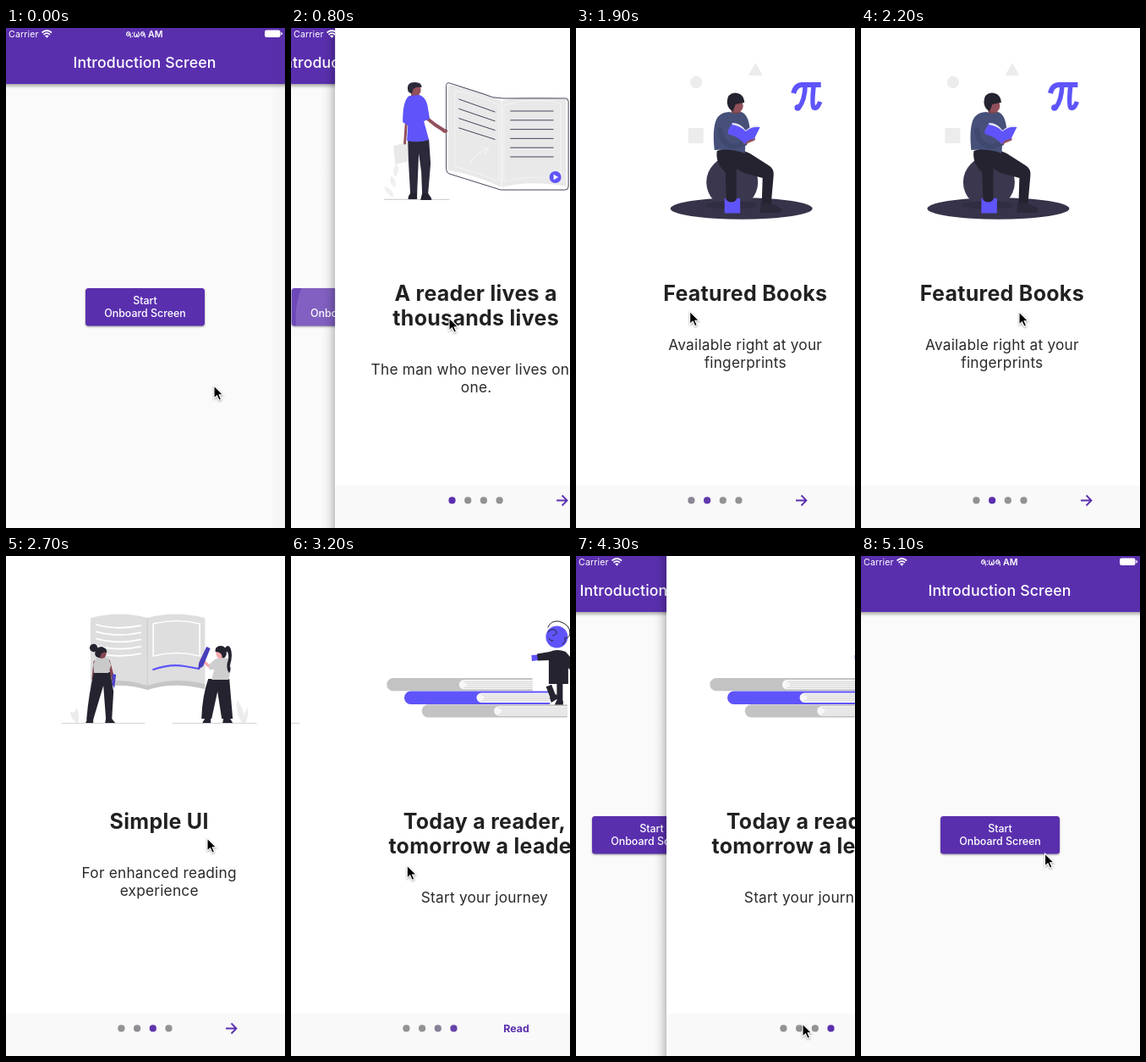
An HTML page that plays this animation: 330 by 590 pixels, repeating every 5200 ms.

```html
<!DOCTYPE html>
<html lang="en">
<head>
<meta charset="utf-8">
<title>Introduction Screen</title>
<style>
  html, body { margin: 0; width: 100%; height: 100%; overflow: hidden; background: #fafafa; }
  svg { display: block; width: 330px; height: 590px; overflow: hidden; }
  text { font-family: Inter, "Noto Sans", sans-serif; font-optical-sizing: none; text-anchor: middle; }
  .bar { font-size: 17.7px; font-weight: 500; letter-spacing: .13px; fill: #fff; }
  .btn { font-size: 12.4px; font-weight: 500; fill: #fff; }
  .title { font-size: 25px; font-weight: 700; letter-spacing: .28px; fill: #212121; }
  .body { font-size: 17.3px; letter-spacing: .22px; fill: #2a2a2a; }
  .status { font-size: 10.6px; fill: #fff; }
  .ln { fill: none; stroke-linecap: round; stroke-linejoin: round; }
</style>
</head>
<body>
<svg viewBox="0 0 330 590" width="330" height="590">
  <defs>
    <linearGradient id="edge">
      <stop offset="0" stop-opacity="0"/><stop offset=".3" stop-opacity=".016"/>
      <stop offset=".6" stop-opacity=".07"/><stop offset="1" stop-opacity=".22"/>
    </linearGradient>
    <linearGradient id="faint"><stop offset="0" stop-opacity="0"/><stop offset="1" stop-opacity=".03"/></linearGradient>
    <clipPath id="btnClip"><rect x="94" y="307" width="141" height="44.5" rx="3.5"/></clipPath>
    <clipPath id="pageClip"><rect x="-2" width="336" height="590"/></clipPath>
  </defs>

  <g id="home">
    <rect x="-4" width="342" height="590" fill="#fafafa"/>
    <rect x="-4" y="-8" width="342" height="74" fill="#5a2fae" style="filter:drop-shadow(0 2px 2px rgba(0,0,0,.4))"/>
    <text class="bar" x="164" y="47">Introduction Screen</text>
    <rect x="94" y="307" width="141" height="44.5" rx="3.5" fill="#5a2fae" style="filter:drop-shadow(0 1.5px 1.2px rgba(0,0,0,.38))"/>
    <g id="ripple" clip-path="url(#btnClip)" fill="#fff">
      <rect x="94" y="307" width="141" height="45" opacity=".12"/>
      <circle id="splash" cx="187" cy="341" opacity=".13"/>
    </g>
    <text class="btn" x="164.5" y="326">Start</text>
    <text class="btn" x="164.5" y="341">Onboard Screen</text>
  </g>
  <rect id="rim" x="312" width="18" height="590" fill="url(#faint)"/>

  <g id="intro">
    <rect x="-19" width="17" height="590" fill="url(#edge)"/>
    <rect x="-2" width="336" height="590" fill="#fff"/>
    <g clip-path="url(#pageClip)"><g id="pages">
      <g>
        <g transform="translate(-54)">
          <g fill="#f0f0f0">
            <path d="M121 200Q112 196 110 187Q120 189 122 200ZM122 188Q115 182 118 174Q126 180 123 188ZM122 174Q119 166 125 160Q130 168 124 175Z"/>
            <path d="M121 139L138 135L140 157L123 161Z" fill="#e9e9e9"/>
          </g>
          <path class="ln" d="M110 202.3H187" stroke="#c9c9cf"/>
          <path d="M186 67Q214 70 249 86Q280 77 325 84V187Q282 179 249 188Q214 172 186 168Z" fill="#e9e9e9"/>
          <path d="M194 74Q219 78 246 91V181Q220 170 194 163ZM252 91Q284 81 319 89V178Q284 173 252 181Z" class="ln" stroke="#f4f4f4"/>
          <path d="M249 86V188" stroke="#f6f6f6" stroke-width="1.5"/>
          <path class="ln" d="M183.500 68Q183.500 64 187.500 65L228 78Q238 83 250 83H324Q328 83 328 87V187Q328 191 324 191H248L187 172Q183.500 171 183.500 167Z" stroke="#47455c"/>
          <path id="lines1" class="ln" stroke="#47455c"/>
          <path class="ln" d="M212 160Q218 146 233 143M226 141L234 143L229 149" stroke="#f8f8f8"/>
          <circle cx="312.500" cy="176" r="7" fill="#5f54fa"/>
          <path d="M310.500 172.800V179.200L316 176Z" fill="#fff"/>
          <path class="ln" d="M160 106L170 114L181 121" stroke="#91505a" stroke-width="4"/>
          <ellipse cx="182" cy="121.500" rx="3" ry="2.300" fill="#91505a"/>
          <path class="ln" d="M136 114L134.500 136" stroke="#91505a" stroke-width="3"/>
          <path d="M142 73H151V84H142Z" fill="#844650"/>
          <ellipse cx="147" cy="73" rx="6.500" ry="7.500" fill="#91505a"/>
          <path d="M138 73Q136.500 64 146.500 64Q154.500 64 154.500 70Q147.500 69 144.500 72L143 77Q138.500 77 138 73Z" fill="#2b293a"/>
          <path d="M138 131H163L165 160L162 196H155L154 170L151 148L149 196H141L139 160Z" fill="#2b293a"/>
          <path d="M141 195H149V202H138.500Q138 199 141 195ZM155 195H162L166 201V203H153Z" fill="#25232f"/>
          <path d="M140 80L152 79Q159 82 161 90L164 107L157 110L163 132Q150 136 137 133L138 115L132 111Q132 84 140 80Z" fill="#5f54fa"/>
        </g>
        <text class="title" x="164.500" y="321.500">A reader lives a</text>
        <text class="title" x="164.500" y="350.500">thousands lives</text>
        <text class="body" x="165" y="409">The man who never lives only</text>
        <text class="body" x="165" y="430">one.</text>
      </g>

      <g>
        <g transform="translate(-2)">
          <g fill="#ececec">
            <circle cx="108.500" cy="64" r="7.200"/><path d="M170 56H187L178.700 41Z"/><path d="M99 118H117V136H99Z"/>
          </g>
          <g class="ln" stroke="#5f54fa" stroke-width="6" style="stroke-linecap:butt">
            <path d="M223.500 77Q226 67 234 67H256"/>
            <path d="M237.500 67Q237 85 230 94M247.500 67Q245 91 247.500 94Q252 96 255 87" stroke-width="5.500"/>
          </g>
          <circle cx="228.500" cy="94" r="3.800" fill="#5f54fa"/>
          <ellipse cx="162" cy="213" rx="84" ry="12.700" fill="#37334a"/>
          <circle cx="151" cy="182" r="30.500" fill="#3b374f"/>
          <ellipse cx="150" cy="209" rx="31" ry="5" fill="#312d42"/>
          <path d="M142 201H160.500V218.500H142Z" fill="#5f54fa"/>
          <path d="M133 145Q150 138 172 148L194 162Q201 166 200 174L197 208H186L187 177L165 171L156 166V203Q150 208 144 203L143 170Q131 160 133 145Z" fill="#25232f"/>
          <path d="M185 206L197 207L209 213Q211 217 206 218H184Z" fill="#2c293a"/>
          <path d="M150 91H161V103H150Z" fill="#7c454e"/>
          <ellipse cx="157" cy="92" rx="7" ry="7.500" fill="#91505a"/>
          <path d="M145 88Q145 77 154 76.500Q165 77 165.500 88L155 90L152 98Q146 96 145 88Z" fill="#25232f"/>
          <path d="M148 99Q155 103 162 99Q169 102 171 113L173 125L167 132L166 148Q152 142 130 144Q127 115 134 105Q139 99 148 99Z" fill="#465078"/>
          <path class="ln" d="M137 120Q138 137 153 140L166 136" stroke="#3f496f" stroke-width="6"/>
          <path class="ln" d="M166 135L176 131" stroke="#91505a" stroke-width="4.500"/>
          <path d="M146 121L151 112Q161 114 167 121Q174 115 184 117L177 131Q170 131 166 137Q158 128 146 125Z" fill="#5f54fa"/>
          <path d="M151 112Q161 112 167 121Q174 114 182 115L184 117Q174 116 167 122Q160 115 151 114Z" fill="#e8e8f5"/>
        </g>
        <text class="title" x="164.500" y="321.500">Featured Books</text>
        <text class="body" x="164.500" y="379.500">Available right at your</text>
        <text class="body" x="164.500" y="400.500">fingerprints</text>
      </g>

      <g>
        <g transform="translate(-16)">
          <path class="ln" d="M66 197.300H164M197 197.300H296" stroke="#d2d2d6"/>
          <path d="M83 197Q75 190 76 183Q82 188 83 178Q88 188 85 197ZM279 197Q271 185 273 170Q280 178 281 188Q284 181 286 178Q287 190 283 197Z" fill="#ececec"/>
          <path d="M100 76L167 80L235 76V157Q198 148 167 158Q135 148 100 157Z" fill="#c6c6c6"/>
          <path d="M100 73Q135 64 167 73Q200 64 235 73V151Q198 142 167 153Q135 142 100 151Z" fill="#dedede"/>
          <path d="M167 73V153" stroke="#cbcbcb"/>
          <path id="lines3" class="ln" stroke="#fff" stroke-width="1.800"/>
          <path class="ln" d="M174 80Q202 73 229 80V118Q202 111 174 118Z" stroke="#fff" stroke-width="1.600"/>
          <path class="ln" d="M174 134Q194 127 211 130T228 133" stroke="#5f54fa" stroke-width="2.200"/>
          <path class="ln" d="M105 125L103 145L106 151M121 124L124 135L127 147" stroke="#854650" stroke-width="3.500"/>
          <path d="M126 139L130 140L128 156L125 151Z" fill="#4f45c9"/>
          <path d="M104 137H123L127 160L125 193H118L115 153L103 193H95Q98 160 104 137Z" fill="#25232f"/>
          <path d="M96 192H103V197H94ZM118 192H125L129 197H117Z" fill="#25232f"/>
          <path d="M106 121Q114 117 121 121L124 129L121 138H104L103 128Z" fill="#c9c9c9"/>
          <ellipse cx="113" cy="115" rx="5.500" ry="6" fill="#854650"/>
          <circle cx="103.500" cy="108.500" r="4.700" fill="#25232f"/>
          <path d="M105 115Q106 107 113 107Q120 109 119 114Q112 112 111 120Q105 120 105 115Z" fill="#25232f"/>
          <path class="ln" d="M250 128L240 130L231 122M261 128L260 150" stroke="#f7aaae" stroke-width="3.600"/>
          <path d="M237 107L241.500 109L233 130L227 134L228 126Z" fill="#463dba"/>
          <path d="M239 145H264L268 192H255L250 160L243 192H231Q232 165 239 145Z" fill="#25232f"/>
          <path d="M235 192H242V197H232ZM257 192H265L268 197H256Z" fill="#25232f"/>
          <path d="M247 122Q257 117 264 122L266 134L263 146H243L246 134L240 134L240 128Z" fill="#cecece"/>
          <g transform="translate(1.5)">
            <ellipse cx="252" cy="115" rx="5.300" ry="6" fill="#f7aaae"/>
            <path d="M246 113Q245 106 253 106Q260 107 259 116Q258 121 254 120Q254 113 246 113ZM257 109Q261 103 264 109Q267 118 263 130Q265 134 262 138Q258 132 261 123Q263 112 257 112Z" fill="#25232f"/>
          </g>
        </g>
        <text class="title" x="165" y="321.500">Simple UI</text>
        <text class="body" x="165" y="379.500">For enhanced reading</text>
        <text class="body" x="165" y="400.500">experience</text>
      </g>

      <g>
        <g id="books"></g>
        <path class="ln" d="M241 153L246 166M254 148V174" stroke="#25232f" stroke-width="7" style="stroke-linecap:butt"/>
        <path d="M242 167L250 163L252 168L244 173ZM250 171H258V175.500H248Z" fill="#25232f"/>
        <path d="M220.500 117L228 116.500L229 123L221 124ZM273 135L280 137L276 143L270 139Z" fill="#5f54fa"/>
        <path d="M227 115.500L242 113Q251 109 261 113Q269 122 275 132L270 139L264 132V151H241V123L228 123.500Z" fill="#25232f"/>
        <circle cx="250.500" cy="95.500" r="13" fill="#5f54fa"/>
        <path class="ln" d="M240 84Q243 76 253 77Q267 81 266 92Q265 97 260 97M240 90Q245 84 249 88Q253 91 246 94M241 97Q243 101 246 100M260 97Q262 102 257 104" stroke="#25232f"/>
        <text class="title" x="165" y="321.500">Today a reader,</text>
        <text class="title" x="165" y="350.500">tomorrow a leader</text>
        <text class="body" x="165" y="409">Start your journey</text>
      </g>
    </g></g>
    <rect x="-2" y="540" width="336" height="50" fill="#f9f9f9"/>
    <g id="dots"></g>
    <path id="next" class="ln" d="M260 557.500H272M266.500 551.500L272.500 557.500L266.500 563.500" stroke="#5a2fae" stroke-width="1.800" style="stroke-linecap:butt;stroke-linejoin:miter"/>
    <text id="done" x="266.500" y="561.500" font-size="12.400" font-weight="700" fill="#5a2fae">Read</text>
  </g>

  <g fill="#fff">
    <text class="status" x="3" y="11" style="text-anchor:start;letter-spacing:.15px">Carrier</text>
    <path class="ln" d="M42.500 5.500Q48.300 .5 54 5.500M44.500 7.800Q48.300 4.500 52 7.800" stroke="#fff" stroke-width="1.700" style="stroke-linecap:butt"/>
    <path d="M46 9.300Q48.300 7.500 50.600 9.300L48.300 11.800Z"/>
    <g class="ln" stroke="#fff" stroke-width="1.100">
      <path id="five" d="M144.500 4.500Q142 6 142.700 8.300Q144.300 10.500 145.900 8.300Q146 6.700 144.600 6.700M144.500 4.500Q147.300 4.500 147.300 11"/>
      <path d="M152 5Q150.800 10.500 153 10.500Q154.700 10.300 154.700 7Q154.700 10.500 156.200 10.500Q158.500 9 156.500 4.800"/>
      <use href="#five" x="17"/>
    </g>
    <circle cx="149.500" cy="6" r=".7"/><circle cx="149.500" cy="10" r=".7"/>
    <text class="status" x="168" y="11" font-weight="600" style="text-anchor:start">AM</text>
    <rect x="306" y="2.500" width="18.500" height="8.500" rx="2.200"/>
    <path d="M325.300 5Q327 5.300 327 6.800Q327 8.300 325.300 8.600Z"/>
  </g>

  <path id="cursor" d="M0 0V15L3.500 11.800L6 17.300L8.600 16.200L6.200 10.800H10.800Z" fill="#000" stroke="#fff" stroke-width="1.100" style="filter:drop-shadow(0 1px 1px rgba(0,0,0,.35))"/>
</svg>

<script>
const LOOP = 5200, STEP = 100, W = 334, SLOP = 16;
const $ = id => document.getElementById(id);
const clamp = v => Math.max(0, Math.min(1, v));
const range = n => [...Array(n).keys()];
const move = (el, x, y = 0) => el.setAttribute('transform', `translate(${x.toFixed(2)} ${y.toFixed(2)})`);

function make(parent, tag, attrs) {
  const el = document.createElementNS('http://www.w3.org/2000/svg', tag);
  for (const k in attrs) el.setAttribute(k, attrs[k]);
  return parent.appendChild(el);
}

// Repeated parts of the drawings
$('lines1').setAttribute('d',
  range(4).map(i => `M198.5 ${84 + i * 11.3}L241 ${99 + i * 10.8}`).join('') +
  range(6).map(i => `M259.500 ${98 + i * 10.8}H310`).join(''));
$('lines3').setAttribute('d',
  range(5).map(i => `M107 ${81 + i * 8.3}Q132 ${88 + i * 8.3} 159 ${82 + i * 8.3}`).join(''));
['#c3c3c3', '#5f54fa', '#c3c3c3'].forEach((fill, i) => {
  const g = make($('books'), 'g', {});
  move(g, 49.5 + i * 20.7, 144 + i * 15.6);
  make(g, 'path', { d: 'M7.500 0H171Q173 0 172 2V13Q173 15.300 171 15.300H7.500A7.600 7.600 0 0 1 7.500 0Z', fill });
  make(g, 'path', { d: 'M91 2H172V13.300H91A5.600 5.600 0 0 1 91 2Z', fill: '#f7f7f7' });
  make(g, 'path', { d: range(4).map(k => `M${k % 3 ? 94 : 91} ${4.3 + k * 2.3}H172`).join(''), stroke: '#c9c9c9', 'stroke-width': .8 });
});
$('pages').querySelectorAll(':scope > g').forEach((p, i) => move(p, i * W));
const dots = range(4).map(i => make($('dots'), 'circle', { cx: 136.4 + i * 18.7, cy: 557.4, r: 4.1 }));

function bezier(x1, y1, x2, y2) {
  const at = (a, b, s) => 3 * a * s * (1 - s) ** 2 + 3 * b * s * s * (1 - s) + s ** 3;
  return u => {
    let lo = 0, hi = 1;
    for (let i = 0; i < 24; i++) {
      const m = (lo + hi) / 2;
      if (at(x1, x2, m) < u) lo = m; else hi = m;
    }
    return at(y1, y2, lo);
  };
}
const route = bezier(.35, .91, .33, .97);
const run = (t, start) => {
  const u = clamp((t - start) / 400);
  return u === 0 || u === 1 ? u : route(u);
};

// Swipes: start time, start x, release time, release x
const POW = 1.33;
const swipes = [[1280, 187, 1635, 89], [2210, 187, 2378, 60], [2840, 238, 3030, 110]];
const dragX = ([t0, x0, t1, x1], t) => x0 + (x1 - x0) * clamp((t - t0) / (t1 - t0)) ** POW;

// Overdamped spring pulling the page home after release
function spring(x, v, t) {
  const a = 9.07, b = 22.05, c = (b * x - v) / (b - a);
  return c * Math.exp(-a * t) + (x - c) * Math.exp(-b * t);
}

function scroll(t) {
  let pos = 0;
  swipes.forEach((s, i) => {
    const [t0, x0, t1, x1] = s;
    if (t < t0) return;
    if (t < t1) pos = i * W + Math.max(0, x0 - dragX(s, t) - SLOP);
    else {
      const v = POW * (x0 - x1) / (t1 - t0) * 1000;
      pos = (i + 1) * W - spring(W - (x0 - x1 - SLOP), v, (t - t1) / 1000);
    }
  });
  return pos;
}

// Pointer stops: time, x, y
const stops = [
  [0, 246, 422], [400, 187, 342], [1280, 187, 342], [1635, 89, 334], [2190, 187, 335],
  [2210, 187, 335], [2378, 60, 334], [2700, 238, 333], [2840, 238, 333], [3030, 110, 334],
  [3700, 280, 528], [4100, 268, 552], [4350, 268, 552], [4800, 222, 370], [5100, 217.5, 351], [LOOP, 217.5, 351]
];
function pointer(t) {
  const i = stops.findIndex(s => s[0] > t);
  const [t0, x0, y0] = stops[i - 1], [t1, x1, y1] = stops[i];
  const u = (t - t0) / (t1 - t0), e = u * u * (3 - 2 * u);
  const drag = swipes.find(s => t >= s[0] && t < s[2]);
  return [drag ? dragX(drag, t) : x0 + (x1 - x0) * e, y0 + (y1 - y0) * e];
}

const ON = [90, 47, 174], OFF = [146, 146, 146];
function draw(t) {
  const shown = run(t, 645) - run(t, 4250);
  move($('home'), -shown * W / 3);
  move($('intro'), (1 - shown) * W);
  $('intro').style.display = shown > 0 ? '' : 'none';
  $('rim').style.display = t < 700 ? '' : 'none';

  const pressed = t > 640 && t < 1200;
  $('ripple').style.display = pressed ? '' : 'none';
  $('splash').setAttribute('r', pressed ? (t - 620) * .49 : 0);

  const pos = scroll(t), page = pos / W;
  move($('pages'), -pos);
  dots.forEach((d, i) => {
    const k = clamp(1 - Math.abs(page - i));
    d.setAttribute('fill', `rgb(${OFF.map((c, j) => Math.round(c + (ON[j] - c) * k))})`);
  });
  $('next').style.display = page > 2.5 ? 'none' : '';
  $('done').style.display = page > 2.5 ? '' : 'none';
  move($('cursor'), ...pointer(t));
}

const begin = performance.now();
function tick() {
  const t = (performance.now() - begin) % LOOP;
  draw(Math.floor(t / STEP) * STEP);
  requestAnimationFrame(tick);
}
tick();
</script>
</body>
</html>
```
